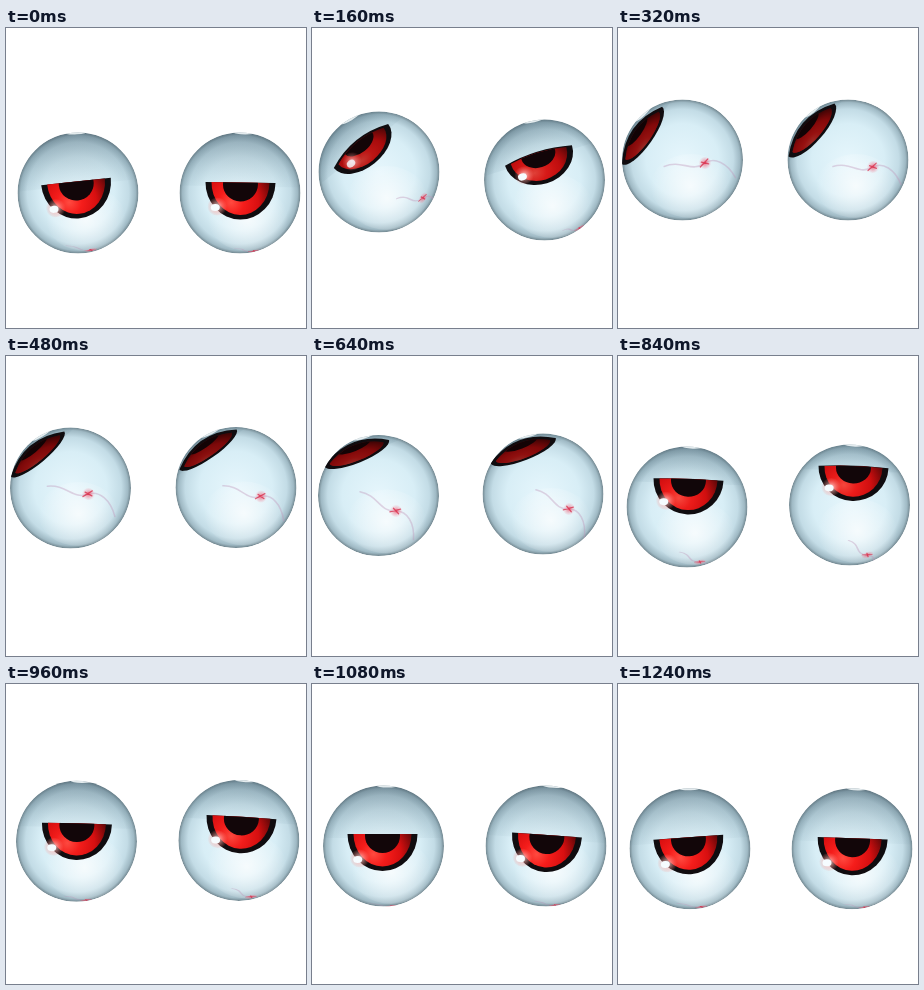
An HTML page with a canvas that plays this animation: 300x300 px, repeating every 1.28 s.

```html
<!DOCTYPE html>
<html lang="en">
<head>
<meta charset="utf-8">
<title>Rolling eyes</title>
<style>
  html, body { margin: 0; width: 100%; height: 100%; overflow: hidden; background: #fff; }
  canvas { display: block; width: 300px; height: 300px; }
</style>
</head>
<body>
<canvas id="stage" width="300" height="300"></canvas>
<script>
const ctx = document.getElementById('stage').getContext('2d');
const LOOP = 1280, STEP = 40, R = 60.5, TAU = Math.PI * 2;
const times = [0, 160, 320, 480, 640, 840, 1080];

// Pose: ball x, y | iris dx, dy | tilt | iris depth | vein dx, dy
const leftEye = [
  [72, 165, -2, -11.5, -6, 37, 13, 57],
  [67, 144, -18, -26, -39, 22, 44, 26],
  [64.5, 132, -40.5, -24.5, -55, 11, 22.5, 3],
  [64.5, 132, -33, -34, -40, 9, 18, 6],
  [66.5, 139.5, -22, -42.5, -22, 10, 17.5, 15.5],
  [69, 151, 1.5, -27.5, 2, 35, 13, 55],
  [71.5, 162, -1, -12, 0, 37, 8, 60]
];
const rightEye = [
  [234, 165, 0.5, -10.5, 1, 37, 14, 58],
  [232.5, 152, -6, -24.5, -17, 29, 35, 48],
  [230, 132, -36.5, -30, -49, 12, 25, 7],
  [230, 131.5, -28, -38, -35, 9, 25, 9],
  [231, 138, -20, -43.5, -21, 10, 26, 15],
  [231.5, 149, 4, -38, 2, 34, 18, 50],
  [234, 162, 1, -11, 4, 37, 9, 59]
];

const n = times.length;
const wrap = i => (i + n) % n;
const span = i => (times[wrap(i + 1)] - times[wrap(i)] + LOOP) % LOOP;

// Cyclic monotone cubic through the poses
function poseAt(keys, t) {
  let i = n - 1;
  while (times[i] > t) i--;
  const h = span(i), s = (t - times[i]) / h;
  return keys[0].map((_, c) => {
    const v = k => keys[wrap(k)][c];
    const slope = k => (v(k + 1) - v(k)) / span(k);
    const tangent = k => {
      const a = slope(k - 1), b = slope(k);
      return a * b > 0 ? 2 * a * b / (a + b) : 0;
    };
    const s2 = s * s, s3 = s2 * s;
    return v(i) * (2 * s3 - 3 * s2 + 1) + v(i + 1) * (3 * s2 - 2 * s3)
      + h * (tangent(i) * (s3 - 2 * s2 + s) + tangent(i + 1) * (s3 - s2));
  });
}

function layer(draw) {
  ctx.save();
  draw();
  ctx.restore();
}

function radial(x, y, r, stops) {
  const g = ctx.createRadialGradient(x, y, 0, x, y, r);
  stops.forEach(([at, color]) => g.addColorStop(at, color));
  return g;
}

function disc(x, y, rx, ry, fill) {
  ctx.beginPath();
  ctx.ellipse(x, y, rx, ry, 0, 0, TAU);
  ctx.fillStyle = fill;
  ctx.fill();
}

function lens(half, depth, bulge) {
  ctx.beginPath();
  ctx.moveTo(-half, 0);
  ctx.quadraticCurveTo(0, -2 * bulge, half, 0);
  ctx.ellipse(0, 0, half, depth, 0, 0, Math.PI);
  ctx.closePath();
}

function drawBall() {
  disc(0, 0, R, R, radial(0, 0, R, [
    [0, '#e6f6fc'], [0.6, '#d8eef6'], [0.84, '#c3dce6'], [0.95, '#9fb9c4'], [1, '#71868f']
  ]));
  disc(8, 26, 40, 32, radial(8, 26, 40, [[0, 'rgba(255,255,255,.75)'], [1, 'rgba(255,255,255,0)']]));
}

function drawVein(x, y, turn) {
  const a = Math.atan2(y, x), d = Math.min(1, Math.hypot(x, y) / R);
  ctx.translate(x, y);
  ctx.rotate(a);
  ctx.scale(Math.max(0.15, Math.sqrt(1 - d * d)), 1);
  ctx.rotate(turn - a);
  ctx.lineCap = 'round';
  ctx.lineWidth = 1.6;
  ctx.strokeStyle = 'rgba(190,150,185,.4)';
  ctx.beginPath();
  ctx.moveTo(-44, 3);
  ctx.bezierCurveTo(-25, -4, -14, 10, 0, 0);
  ctx.bezierCurveTo(10, -6, 24, 0, 33, 15);
  ctx.stroke();
  disc(0, 0, 7, 6, radial(0, 0, 7, [[0, 'rgba(235,70,95,.75)'], [1, 'rgba(240,150,170,0)']]));
  ctx.lineWidth = 1.3;
  ctx.strokeStyle = 'rgba(215,35,65,.7)';
  ctx.beginPath();
  ctx.moveTo(-5, 4);
  ctx.lineTo(3, -4);
  ctx.moveTo(-4, -1);
  ctx.lineTo(4, 1);
  ctx.stroke();
}

function drawLid(bulge, dist) {
  const g = ctx.createLinearGradient(0, -R * 0.8, 0, 4);
  const a = 0.25 + 0.013 * dist;
  g.addColorStop(0, `rgba(65,90,105,${a})`);
  g.addColorStop(1, `rgba(110,145,160,${a * 0.15})`);
  ctx.fillStyle = g;
  ctx.fillRect(-130, -130, 260, 134);
}

function drawIris(depth, bulge) {
  const k = depth / 37;
  lens(35, depth, bulge);
  ctx.fillStyle = '#100c0f';
  ctx.fill();
  layer(() => {
    lens(29, depth - 4.5 * Math.sqrt(k), bulge * 0.75);
    ctx.clip();
    layer(() => {
      ctx.scale(1, Math.max(k, 0.4));
      disc(0, 0, 40, 60, radial(-9, 20, 42, [
        [0, '#ff4a40'], [0.3, '#f51d1b'], [0.65, '#d80f10'], [1, '#650708']
      ]));
    });
    disc(0, 2 - bulge * 0.8, 17.5, 17 * k, '#120609');
    ctx.fillStyle = `rgba(20,0,0,${(1 - k) * 0.62})`;
    ctx.fillRect(-40, -40, 80, 80);
  });

  const shine = Math.max(0, Math.min(1, (depth - 14) / 10));
  if (shine) {
    const u = -10 - 0.4 * depth, v = 1.2 * depth - 19;
    ctx.globalAlpha = shine;
    disc(u + 2, v - 1, 10, 9, radial(u + 2, v - 1, 10, [
      [0, 'rgba(255,225,225,.9)'], [1, 'rgba(255,120,110,0)']
    ]));
    disc(u, v, 4.5, 3.5, '#f6fcff');
  }
}

function drawEye(keys, t) {
  const [bx, by, ix, iy, tilt, depth, vx, vy] = poseAt(keys, t);
  const turn = tilt * Math.PI / 180;
  const bulge = Math.min(11, Math.max(0, (37 - depth) / 2));
  layer(() => {
    ctx.translate(bx, by);
    ctx.beginPath();
    ctx.arc(0, 0, R, 0, TAU);
    ctx.clip();
    drawBall();
    layer(() => drawVein(vx, vy, turn + 0.96));
    layer(() => {
      ctx.translate(ix, iy);
      ctx.rotate(turn);
      drawLid(bulge, Math.hypot(ix, iy));
      drawIris(depth, bulge);
    });
    layer(() => {
      ctx.rotate(turn * 0.8);
      disc(4, -R, 11, 2, 'rgba(250,254,255,.85)');
    });
  });
}

function frame(now) {
  const t = Math.floor((now % LOOP) / STEP) * STEP;
  ctx.fillStyle = '#fff';
  ctx.fillRect(0, 0, 300, 300);
  drawEye(leftEye, t);
  drawEye(rightEye, t);
  requestAnimationFrame(frame);
}
frame(performance.now());
</script>
</body>
</html>
```
